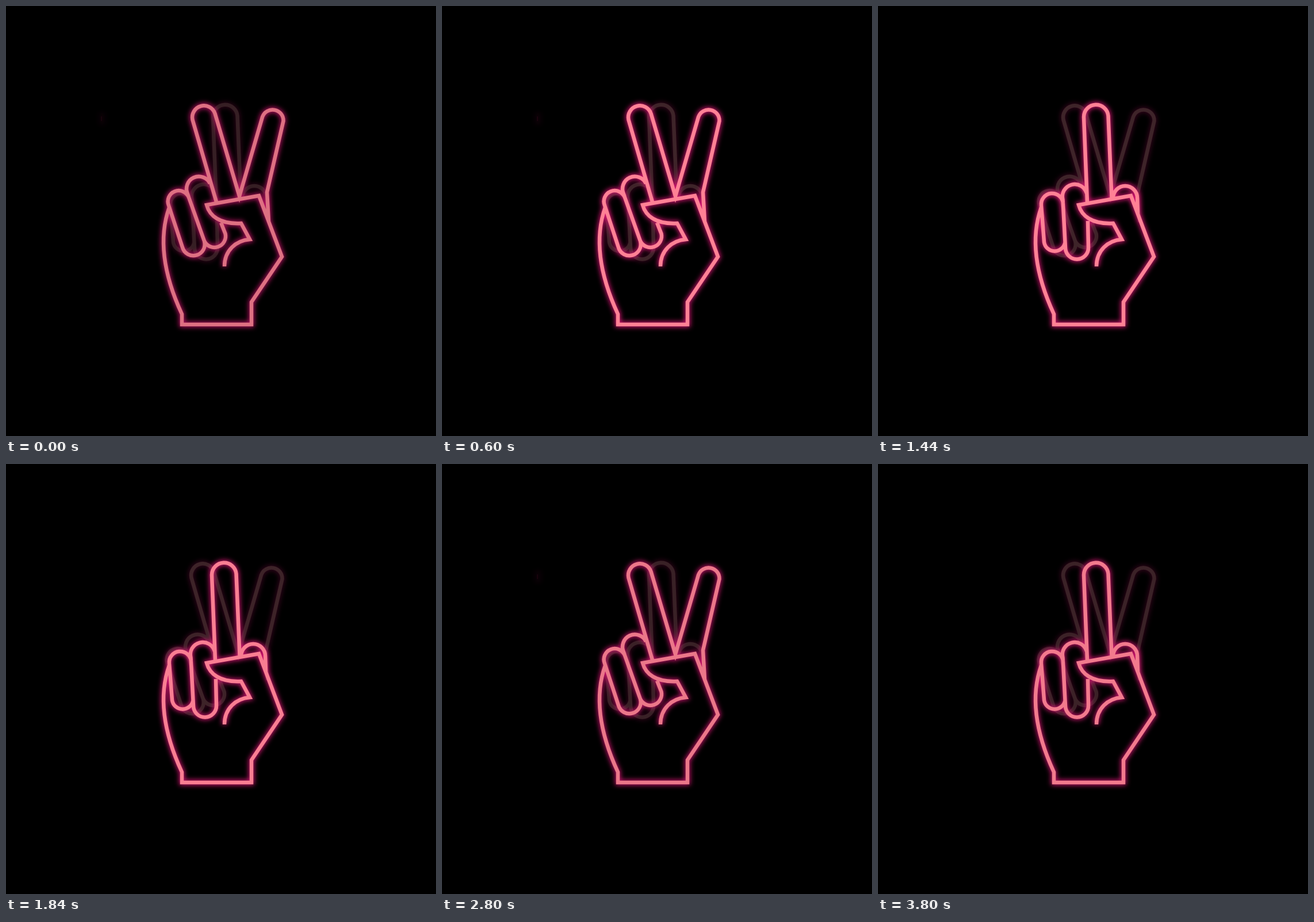
An HTML page with a canvas for the animation above (3.84 s loop, 748 by 748 pixels).

```html
<!DOCTYPE html>
<html lang="en">
<head>
<meta charset="utf-8">
<title>Neon hand</title>
<style>
html, body { margin: 0; width: 100%; height: 100%; overflow: hidden; background: #000; }
canvas { display: block; width: 748px; height: 748px; }
</style>
</head>
<body>
<canvas id="stage" width="748" height="748"></canvas>
<script>
const SIZE = 748, LOOP = 3840, STEP = 40, POSE = 960;
const PINK = 'rgb(255,129,149)', UNLIT = 'rgb(62,36,41)', GLOW = 'rgb(215,20,115)';

const palm = new Path2D(
  'M284 350C262 412 280 480 306 536V554H427V515L480 436L440 330L349 346' +
  'C354 365 372 380 409 378L424 406C400 408 380 425 380 453');

const peace = new Path2D(
  'M366 341L324.5 198A20.3 20.3 0 0 1 363.5 187L406 331L446 193' +
  'A18.8 18.8 0 0 1 482.5 200L454 324L457 376' +
  'M318 333L345 409A19.6 19.6 0 0 1 307 420L283 347A18.8 18.8 0 0 1 318 333' +
  'M318 333L316 327A21.3 21.3 0 0 1 355 309' +
  'M345 409A19.5 19.5 0 0 0 381.5 396L374 377');

const single = new Path2D(
  'M364 342L358 193A21.3 21.3 0 0 1 400.5 191L406.5 333' +
  'M409 334A21 21 0 0 1 451 334L452 361' +
  'M363 326A21 21 0 0 0 321.5 337L326 421A20 20 0 0 0 366 420L365 374' +
  'M322 343A19 19 0 0 0 284 347L289 411A18.5 18.5 0 0 0 325.5 411');

function tube(ctx, path, color, glowAlpha) {
  ctx.save();
  ctx.filter = 'blur(4.5px)';
  ctx.globalAlpha = glowAlpha;
  ctx.strokeStyle = GLOW;
  ctx.lineWidth = 9;
  ctx.stroke(path);
  ctx.restore();
  ctx.strokeStyle = color;
  ctx.lineWidth = 6.5;
  ctx.stroke(path);
}

function makeSign(lit, unlit, shift, speck) {
  const layer = document.createElement('canvas');
  layer.width = layer.height = SIZE;
  const ctx = layer.getContext('2d');
  ctx.fillRect(0, 0, SIZE, SIZE);
  ctx.save();
  ctx.translate(shift, 0);
  tube(ctx, unlit, UNLIT, 0.25);
  ctx.restore();
  const whole = new Path2D(palm);
  whole.addPath(lit);
  tube(ctx, whole, PINK, 1);
  if (speck) {
    ctx.fillStyle = 'rgb(38,6,18)';
    ctx.fillRect(165.5, 192, 1, 8);
    ctx.filter = 'blur(4px)';
    ctx.fillStyle = 'rgba(60,4,30,0.3)';
    ctx.fillRect(163, 186, 8, 20);
  }
  return layer;
}

const signs = [makeSign(peace, single, 2, true), makeSign(single, peace, -2, false)];

// Flicker: time in ms, brightness
const flicker = [
  [0, .87], [160, .95], [320, .82], [440, .92], [600, 1], [760, .87], [960, .95],
  [1120, 1], [1200, 1], [1320, .91], [1440, 1], [1600, .87], [1800, .97], [2000, 1],
  [2160, .88], [2360, .76], [2520, .9], [2640, .98], [2800, .92], [3000, 1],
  [3160, .87], [3320, .98], [3440, 1], [3600, .87], [3800, .95], [3840, .87]
];

function brightness(t) {
  const i = flicker.findIndex(key => key[0] > t);
  const [t0, b0] = flicker[i - 1], [t1, b1] = flicker[i];
  return b0 + (b1 - b0) * (t - t0) / (t1 - t0);
}

const stage = document.getElementById('stage').getContext('2d');

function draw() {
  const t = Math.floor(performance.now() % LOOP / STEP) * STEP;
  stage.drawImage(signs[Math.floor(t / POSE) % 2], 0, 0);
  stage.fillStyle = `rgba(0,0,0,${1 - brightness(t)})`;
  stage.fillRect(0, 0, SIZE, SIZE);
  requestAnimationFrame(draw);
}
draw();
</script>
</body>
</html>
```
